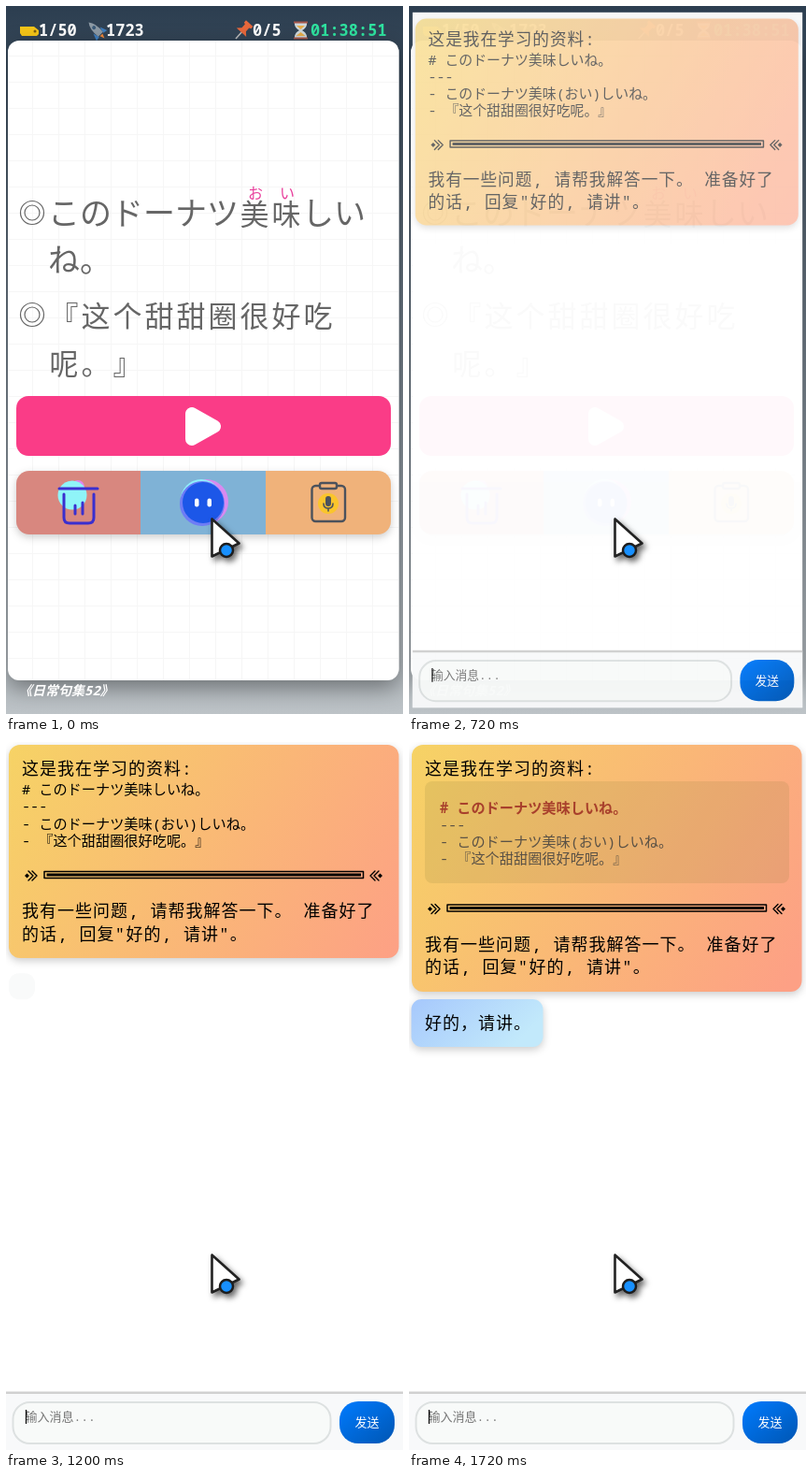
An HTML page that plays this animation: 425 by 757 pixels, repeating every 2000 ms.

```html
<!DOCTYPE html>
<html lang="zh">
<head>
<meta charset="utf-8">
<style>
html, body { margin: 0; width: 100%; height: 100%; overflow: hidden; background: #fff; }
svg { display: block; }
text { font-family: 'Noto Sans Mono', 'Noto Sans CJK SC', monospace; text-spacing-trim: space-all; }
.ja { font-family: 'Noto Sans CJK JP', 'Noto Sans CJK', sans-serif; }
.big { font-size: 34px; fill: #666; font-weight: 300; }
.han { font-size: 31px; letter-spacing: 3px; }
.ruby { font-size: 16px; fill: #e8409c; text-anchor: middle; }
.head { font-size: 17px; font-weight: 600; fill: #fff; }
.body { font-size: 18px; letter-spacing: 1px; font-weight: 300; }
.code { font-size: 15.2px; }
.small { font-size: 13px; }
.line { fill: none; stroke-linecap: round; stroke-linejoin: round; }
.lift { filter: drop-shadow(0 3px 4px #0003); }
#modal { transform-box: view-box; transform-origin: 212.5px 378.5px; }
</style>
</head>
<body>
<svg width="425" height="757" viewBox="0 0 425 757">
<defs>
  <linearGradient id="sky" x2="0" y2="1"><stop stop-color="#2c3e50"/><stop offset="1" stop-color="#bdc3c7"/></linearGradient>
  <linearGradient id="warm" gradientUnits="userSpaceOnUse" x1="5" y1="-4" x2="419" y2="236"><stop stop-color="#f6d365"/><stop offset="1" stop-color="#fda085"/></linearGradient>
  <linearGradient id="cool" x2="1" y2=".4"><stop stop-color="#a6c8fc"/><stop offset="1" stop-color="#c2e9fb"/></linearGradient>
  <linearGradient id="blue" x2="1" y2="1"><stop stop-color="#007bff"/><stop offset="1" stop-color="#0056b3"/></linearGradient>
  <pattern id="grid" width="28" height="28" x="28" y="53" patternUnits="userSpaceOnUse"><path d="M.5 0V28M0 .5H28" stroke="#f6f6f6"/></pattern>
  <clipPath id="bar"><rect x="11" y="497" width="401" height="68" rx="14"/></clipPath>
  <g id="tip"><path d="M20 143l2.500-2.500 2.500 2.500-2.500 2.500z"/><path class="line" d="M24 138l5 5-5 5M28 138l5 5-5 5" stroke="#000" stroke-width="1.400"/></g>
</defs>

<!-- study card -->
<g id="study">
  <rect width="425" height="757" fill="url(#sky)"/>
  <path d="M15 22h15l5 4v4l-2 2H17l-2-3z" fill="#f5c518"/><circle cx="31" cy="27" r="1.500" fill="#806010"/>
  <g transform="rotate(-45 97 26)">
    <path d="M92 26l-3 8 5-1zM102 26l3 8-5-1z" fill="#3f7fc0"/>
    <path d="M97 14q5 6 3.500 18h-7Q92 20 97 14z" fill="#8d9aa5"/><circle cx="97" cy="22" r="2" fill="#3a5a78"/>
    <path d="M95 33h4l-2 5z" fill="#f0883a"/>
  </g>
  <g transform="rotate(42 254 26)">
    <path d="M254 28v10" stroke="#bbb" stroke-width="1.500"/>
    <path d="M249 16h10v3l-2 1v5l4 4h-14l4-4v-5l-2-1z" fill="#e8683c"/>
  </g>
  <path d="M309 17h13v3q-1 4-5 6 4 2 5 6v3h-13v-3q1-4 5-6-4-2-5-6z" fill="#cfd8dc"/>
  <path d="M311 21h9l-4.500 4zM310.500 32l5-4 5 4z" fill="#e8ae4a"/><path d="M308 17.500h15M308 34.500h15" stroke="#a5564a" stroke-width="2"/>
  <text class="head" x="35" y="32">1/50</text><text class="head" x="107" y="32">1723</text>
  <text class="head" x="264" y="32">0/5</text><text class="head" x="326" y="32" style="fill:#2fe3a0">01:38:51</text>
  <rect x="2" y="37" width="418.500" height="684" rx="12" fill="#fff" style="filter:drop-shadow(0 8px 12px #0006)"/>
  <rect x="2" y="37" width="418.500" height="684" rx="12" fill="url(#grid)"/>
  <g class="line" stroke="#666" stroke-width="1.200">
    <circle cx="28" cy="221" r="12.500"/><circle cx="28" cy="221" r="8"/>
    <circle cx="28" cy="330" r="12.500"/><circle cx="28" cy="330" r="8"/>
  </g>
  <text class="ja ruby" x="267" y="206">お</text><text class="ja ruby" x="301" y="206">い</text>
  <text class="ja big" x="45" y="234">このドーナツ<tspan class="han" dx="1.500">美味</tspan><tspan dx="-1.500">しい</tspan></text>
  <text class="ja big" x="45" y="284">ね。</text>
  <text class="big han" x="46.500" y="342.500">『这个甜甜圈很好吃</text>
  <text class="big han" x="46.500" y="393.500">呢。』</text>

  <rect x="11" y="417" width="401" height="64" rx="13" fill="#fa3c87"/>
  <path d="M199 436v27l24-13.500z" fill="#fff" stroke="#fff" stroke-width="14" stroke-linejoin="round"/>
  <g class="lift"><g clip-path="url(#bar)">
    <path d="M11 497h134v68H11z" fill="#d8877f"/>
    <path d="M144 497h134v68H144z" fill="#7fb2d6"/>
    <path d="M278 497h134v68H278z" fill="#f0b27a"/>
  </g></g>
  <circle cx="77" cy="514" r="7" fill="#df86ee"/><circle cx="71" cy="523" r="15.500" fill="#8ff4f8"/>
  <path class="line" d="M57 516H98M62 522v25q0 6 6 6h20q6 0 6-6V522M74 534v9M82 531v12" stroke="#3a2fcf" stroke-width="3"/>
  <circle cx="214" cy="530" r="24" fill="#d98af0"/><circle cx="209" cy="528" r="22" fill="#8ff0fa"/>
  <circle cx="210" cy="532" r="24" fill="#6e7cf5"/><circle cx="211" cy="531" r="22" fill="#1c57e8"/>
  <rect x="202" y="526.500" width="4.500" height="9" rx="2.200" fill="#fff"/><rect x="215.500" y="526.500" width="4.500" height="9" rx="2.200" fill="#fff"/>
  <circle cx="345" cy="532" r="11" fill="#fac52c"/>
  <g class="line" stroke="#4c525c" stroke-width="2.400">
    <rect x="327.500" y="513" width="35.500" height="38" rx="4"/><rect x="336" y="510" width="18" height="6" rx="2" fill="#f0b27a"/>
    <path d="M340 532q0 5 5 5t5-5M345 537v3" stroke-width="1.600"/>
  </g>
  <rect x="342" y="524" width="6" height="11" rx="3" fill="#4c525c"/>
  <text x="14" y="737" font-size="14" font-weight="600" font-style="italic" fill="#fff">《日常句集52》</text>
</g>

<circle id="ring" cx="222" cy="548" r="19" fill="#1890ff" fill-opacity=".2" stroke="#1890ff" stroke-opacity=".5" stroke-width="2"/>

<!-- chat window -->
<g id="modal">
  <rect width="425" height="757" fill="#fff"/>
  <g id="ask">
    <rect id="askBox" class="lift" x="3" y="3" width="417.500" rx="12" fill="url(#warm)"/>
    <g id="askText">
      <text class="body" x="17" y="35">这是我在学习的资料:</text>
      <g id="plain"></g>
      <g id="block"><rect x="17" y="42" width="390" height="109" rx="8" fill="#8a7a3a" fill-opacity=".16"/></g>
      <g id="rest">
        <use href="#tip"/><use href="#tip" transform="matrix(-1 0 0 1 423 0)"/>
        <path class="line" d="M41 138.500H382.500V145.500H41z" stroke="#000" stroke-width="1.500"/>
        <path d="M43.500 142H380" stroke="#000" stroke-width="3"/>
        <text class="body" x="17" y="187">我有一些问题, 请帮我解答一下。 准备好了</text>
        <text class="body" x="17" y="211.500">的话, 回复"好的, 请讲"。</text>
      </g>
    </g>
  </g>
  <rect id="dot" x="3" y="239" width="28" height="28" rx="11" fill="#dfe6e6"/>
  <g id="reply">
    <rect class="lift" x="2.500" y="275" width="141" height="51" rx="11" fill="url(#cool)"/>
    <text class="body" x="17" y="307">好的，请讲。</text>
  </g>
  <rect y="696" width="425" height="61" fill="#f8f9fa"/>
  <rect y="694.500" width="425" height="2.500" fill="#d0d0d0"/>
  <rect x="7.500" y="706" width="340" height="44" rx="18" fill="#f8faf9" stroke="#dde1e1" stroke-width="2"/>
  <text class="small" x="20.500" y="726" fill="#757575">输入消息...</text>
  <path id="caret" d="M21.500 714v15" stroke="#000" stroke-width="1.200"/>
  <rect x="357" y="705" width="59" height="45" rx="20" fill="url(#blue)"/>
  <text class="small" x="386.500" y="732" fill="#fff" text-anchor="middle">发送</text>
</g>

<g style="filter:drop-shadow(3px 4px 3px #0009)">
  <path d="M220.500 548.500V588.500L249.500 574.500z" fill="#fff" stroke="#222" stroke-width="2.600" stroke-linejoin="round"/>
  <circle cx="236" cy="582" r="7" fill="#1890ff" stroke="#1c1c1c" stroke-width="2.500"/>
</g>
</svg>
<script>
const $ = id => document.getElementById(id);
const show = (id, on) => $(id).style.display = on ? '' : 'none';
const clamp = u => Math.min(1, Math.max(0, u));
const easeOut = u => 1 - (1 - clamp(u)) ** 3;

const notes = ['# このドーナツ美味しいね。', '---', '- このドーナツ美味(おい)しいね。', '- 『这个甜甜圈很好吃呢。』'];
function addNotes(id, x, y, style) {
  notes.forEach((note, i) => {
    const el = document.createElementNS('http://www.w3.org/2000/svg', 'text');
    el.setAttribute('class', 'code');
    el.setAttribute('x', x);
    el.setAttribute('y', y + i * 18.3);
    el.setAttribute('style', style(i));
    el.textContent = note;
    $(id).append(el);
  });
}
addNotes('plain', 17, 56, () => '');
addNotes('block', 33, 75.5, i => i ? 'fill:#5a5145' : 'fill:#a8402c;font-weight:700');

// messages rise 10px while fading in
function rise(id, t, start) {
  const p = easeOut((t - start) / 574);
  $(id).setAttribute('transform', `translate(0 ${10 * (1 - p)})`);
  $(id).style.opacity = p;
}

const steps = [0, 320, 400, 680, 720, 800, 880, 960, 1040, 1120, 1200,
  1280, 1320, 1360, 1400, 1480, 1560, 1640, 1720];

function draw(now) {
  const time = now % 2000;
  const t = steps.filter(s => s <= time).pop() || 0;
  const settled = t >= 880, answered = t >= 1280;

  show('ring', t === 320);
  show('modal', t >= 680);
  const left = (1 - clamp((t - 680) / 100)) ** 2;
  $('modal').style.transform = `scale(${1 - 0.05 * left})`;
  $('modal').style.opacity = 1 - 0.1 * left;

  rise('ask', t, 562);
  $('askBox').setAttribute('height', answered ? 264 : settled ? 228 : 225);
  $('askText').setAttribute('transform', `translate(0 ${settled ? 0 : -2.5})`);
  $('rest').setAttribute('transform', `translate(0 ${answered ? 35.5 : 0})`);
  show('plain', !answered);
  show('block', answered);

  show('dot', t === 1200);
  show('reply', answered);
  rise('dot', t, 1162);
  rise('reply', t, 1162);
  show('caret', !answered || t >= 1720);
}

const begin = performance.now();
function tick() {
  draw(performance.now() - begin);
  requestAnimationFrame(tick);
}
tick();
</script>
</body>
</html>
```
